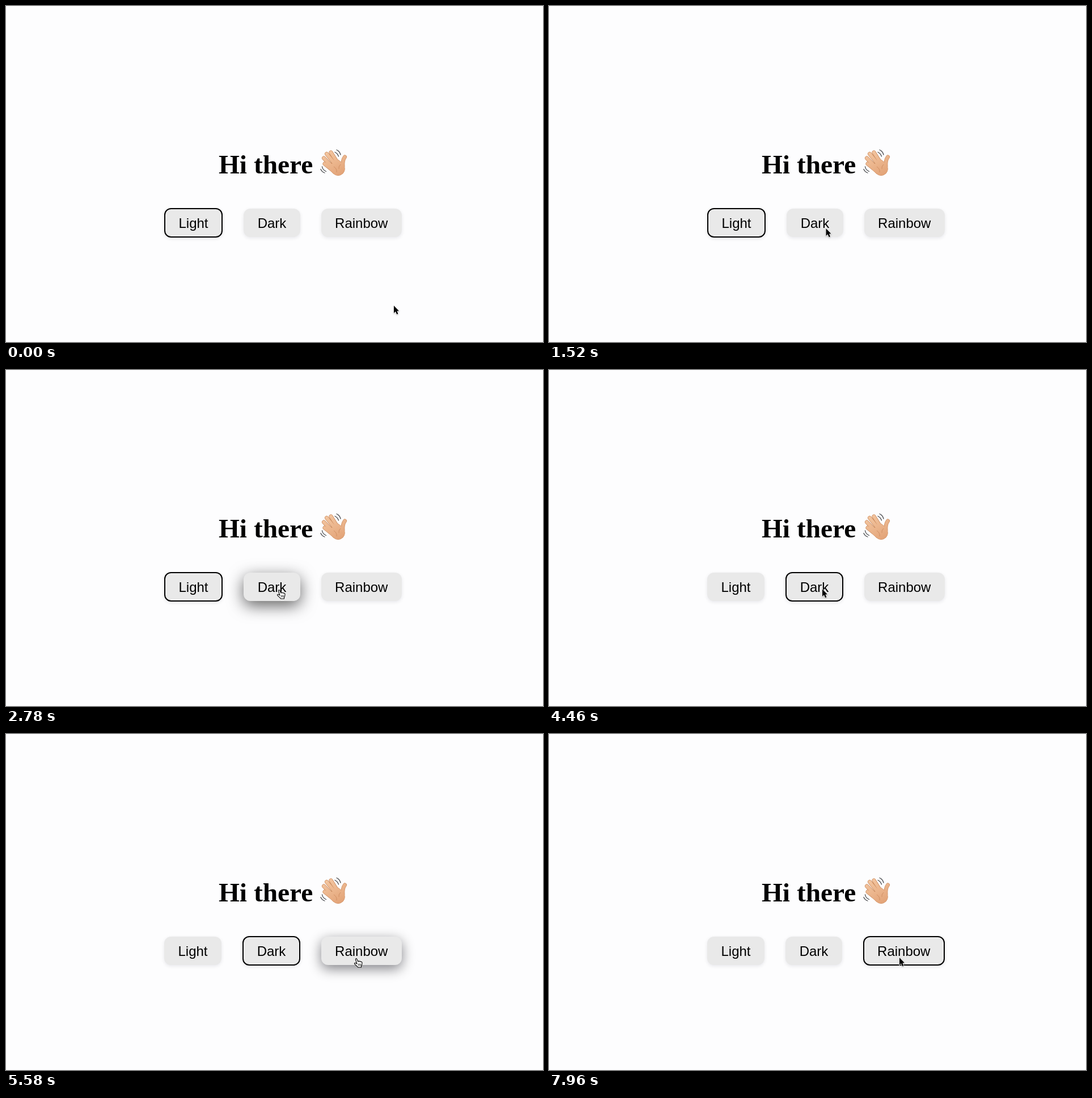
An HTML page that plays this animation: 947x592 px, repeating every 8000 ms.

```html
<!DOCTYPE html>
<html lang="en">
<head>
<meta charset="utf-8">
<title>Theme buttons</title>
<style>
  html, body { margin: 0; width: 100%; height: 100%; overflow: hidden; background: #fdfdfe; }
  svg { position: absolute; left: 0; top: 0; }
  .button {
    position: absolute; box-sizing: border-box;
    display: flex; align-items: center; justify-content: center;
    background: #e9e9e9; border-radius: 12px; color: #000;
    font: 24px/27px "Liberation Sans", Arial, sans-serif;
  }
  .selected { border: 2px solid #000; }
</style>
</head>
<body>
<svg width="947" height="592" viewBox="0 0 947 592">
  <defs>
    <linearGradient id="skin" gradientUnits="userSpaceOnUse" x1="566" y1="258" x2="590" y2="300">
      <stop offset="0" stop-color="#f3c59f"/>
      <stop offset="1" stop-color="#e2a276"/>
    </linearGradient>
    <g id="fingers" fill="none" stroke-linecap="round" stroke-linejoin="round">
      <path d="M573 258L587 280M565.5 260.5L582 281M560.5 268L578 286M562 278L578 291"/>
      <path d="M597.5 266Q593 272 594 283"/>
    </g>
    <path id="palm" d="M573 279L586 271L593 277Q601 287 594 295Q586 302 577 295L570 288Z"/>
  </defs>
  <text x="375" y="294.5" font-family="'Liberation Serif', 'Times New Roman', serif"
        font-weight="bold" font-size="47.4">Hi there</text>
  <use href="#fingers" stroke="#c9885b" stroke-width="7"/>
  <use href="#palm" fill="#c9885b" stroke="#c9885b"/>
  <use href="#fingers" stroke="url(#skin)" stroke-width="5.6"/>
  <use href="#palm" fill="url(#skin)"/>
  <path d="M578 283Q584 287 583 293M590 279Q586 283 587 287" fill="none" stroke="#c98a5e" stroke-width=".8"/>
  <path d="M580 257.5Q585 260 586.5 265M583 253.5Q588.5 256 590 262M557.5 283Q558.5 289 564.5 291.5M555 287.5Q557 292.5 562 294"
        fill="none" stroke="#45474b" stroke-width="1.3" stroke-linecap="round"/>
</svg>

<div id="buttons"></div>

<svg width="947" height="592" viewBox="0 0 947 592">
  <g id="arrow" style="filter: drop-shadow(0 1px 1px rgba(0,0,0,.25))">
    <path d="M0 0V13L3 10.3L5.2 15.2L7.5 14.2L5.4 9.4L9 9.2Z"
          stroke="#fff" stroke-width="1.4" paint-order="stroke" stroke-linejoin="round"/>
  </g>
  <g id="hand" stroke="#000" stroke-linejoin="round" stroke-linecap="round">
    <path d="M6 11L3.6 4C2.8 1.5 5.2 .8 6 3L7.8 7C8.2 5.8 10 5.8 10.4 7C11 6.2 12.4 6.4 12.8 7.6C14 7 15 7.8 15 9.2C15 12 14.4 13 13.6 14.6L13.4 17H7.6C7 15.5 3 12.5 1.6 10.8C1 9.4 2.8 8.8 4 9.8Z"
          fill="#fff" stroke-width="1.1"/>
    <path d="M8.4 11V14M10.4 11V14M12.3 11V14" fill="none" stroke-width=".8"/>
  </g>
</svg>

<script>
const LOOP = 8000, FADE_IN = 1100, FADE_OUT = 900;
const buttons = [
  { label: 'Light', left: 279, width: 101 },
  { label: 'Dark', left: 417, width: 100, hover: 1720, click: 3440 },
  { label: 'Rainbow', left: 554, width: 141.5, hover: 5020, click: 6800 }
];
// Pointer stops: time, x, y
const path = [
  [0, 684, 528], [120, 684, 528], [920, 559, 456], [1640, 483, 387],
  [2400, 483, 387], [2700, 482, 386], [4480, 482, 386], [5120, 618, 394], [LOOP, 618, 394]
];

const clamp = v => Math.max(0, Math.min(1, v));
const mix = (a, b, k) => a + (b - a) * k;
const smooth = k => k * k * (3 - 2 * k);
const easeOut = k => 1 - (1 - k) ** 2;

for (const b of buttons) {
  b.node = document.createElement('div');
  b.node.textContent = b.label;
  document.getElementById('buttons').append(b.node);
}

function glow(b, t) {
  if (!b.hover || t < b.hover) return 0;
  return t < b.click
    ? easeOut(clamp((t - b.hover) / FADE_IN))
    : 1 - easeOut(clamp((t - b.click) / FADE_OUT));
}

function drawButtons(t) {
  const selected = t >= buttons[2].click ? 2 : t >= buttons[1].click ? 1 : 0;
  buttons.forEach((b, i) => {
    const on = i === selected, k = glow(b, t), s = b.node.style;
    b.node.className = on ? 'button selected' : 'button';
    s.left = b.left + (selected < i ? 2 : 0) + 'px';
    s.top = (on ? 356 : 357) + 'px';
    s.width = b.width + (on ? 2 : 0) + 'px';
    s.height = (on ? 52 : 50) + 'px';
    s.boxShadow = `0 ${mix(2, 8, k)}px ${mix(6, 28, k)}px rgba(0,0,${mix(40, 0, k)},${mix(.09, .62, k)})`;
  });
}

function drawPointer(t) {
  const i = path.findIndex((p, n) => n && t < p[0]);
  const [t0, x0, y0] = path[i - 1], [t1, x1, y1] = path[i];
  const k = smooth((t - t0) / (t1 - t0));
  const x = mix(x0, x1, k), y = mix(y0, y1, k);
  const hovering = buttons.some(b => b.hover && t >= b.hover && t < b.click);
  arrow.style.display = hovering ? 'none' : '';
  hand.style.display = hovering ? '' : 'none';
  arrow.setAttribute('transform', `translate(${x} ${y})`);
  hand.setAttribute('transform', `translate(${x - 5} ${y})`);
}

const arrow = document.getElementById('arrow'), hand = document.getElementById('hand');

function frame() {
  const t = performance.now() % LOOP;
  drawButtons(t);
  drawPointer(t);
  requestAnimationFrame(frame);
}
frame();
</script>
</body>
</html>
```
